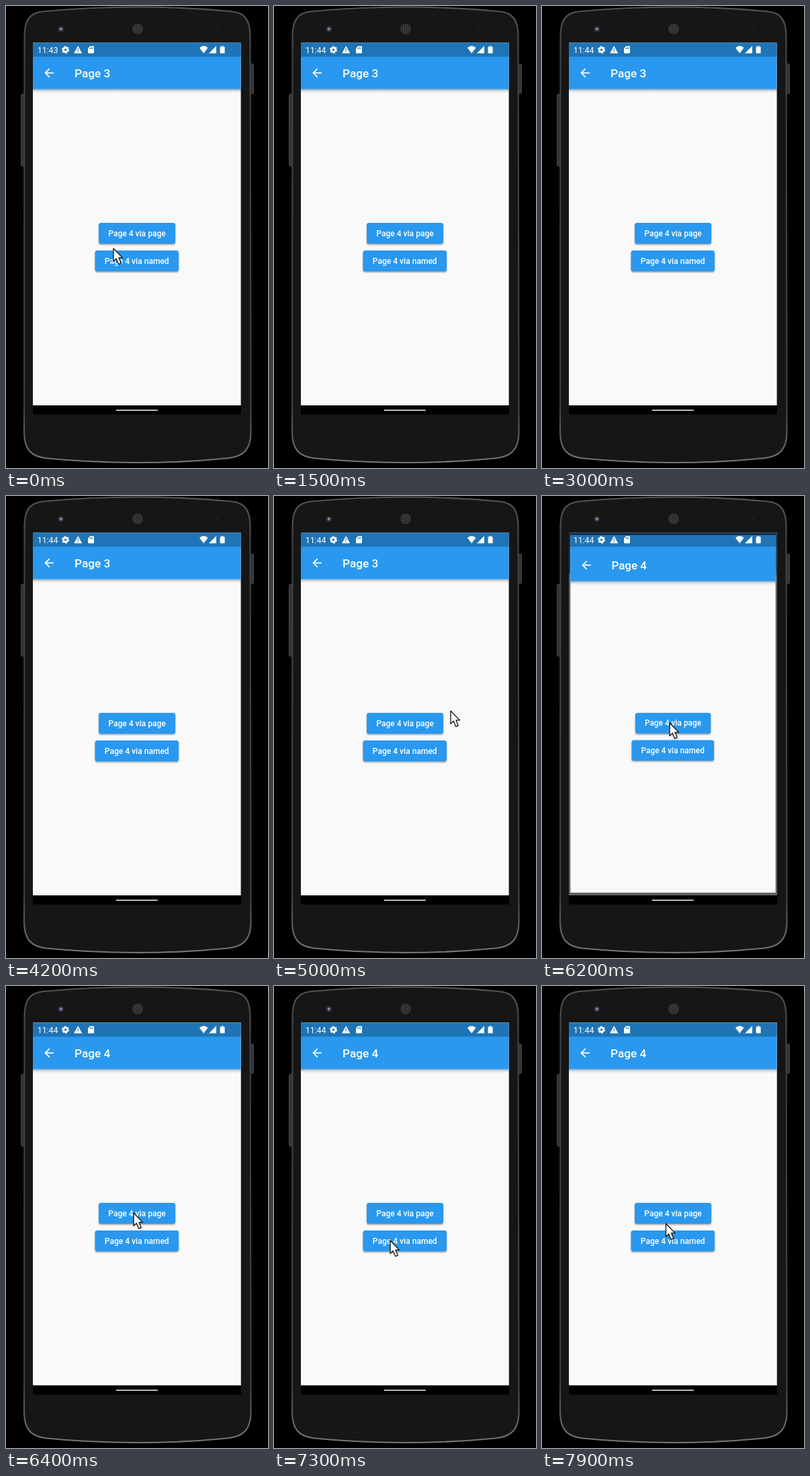
An HTML page that plays this animation: 390x686 px, repeating every 8 s.

```html
<!DOCTYPE html>
<html lang="en">
<head>
<meta charset="utf-8">
<title>Page navigation</title>
<style>
  html, body { margin: 0; width: 100%; height: 100%; overflow: hidden; background: #000; }
  svg { display: block; width: 390px; height: 686px; }
  text { font-family: Roboto, sans-serif; fill: #fff; }
  .title { font-size: 17.2px; font-weight: 500; }
  .label { font-size: 12.06px; font-weight: 500; text-anchor: middle; }
  .clock { font-size: 12.3px; }
</style>
</head>
<body>
<svg viewBox="0 0 390 686" xmlns="http://www.w3.org/2000/svg">
  <defs>
    <linearGradient id="rim" x1="0" y1="0" x2="0" y2="1">
      <stop offset="0" stop-color="#555"/>
      <stop offset=".12" stop-color="#404040"/>
      <stop offset=".88" stop-color="#404040"/>
      <stop offset="1" stop-color="#777"/>
    </linearGradient>
    <linearGradient id="barShade" x1="0" y1="0" x2="0" y2="1">
      <stop offset="0" stop-opacity=".34"/>
      <stop offset=".4" stop-opacity=".11"/>
      <stop offset="1" stop-opacity="0"/>
    </linearGradient>
    <pattern id="mesh" width="3" height="3" patternUnits="userSpaceOnUse">
      <rect width="3" height="3" fill="#1d1d1d"/>
      <circle cx="1" cy="1" r=".9" fill="#565656"/>
      <circle cx="2.5" cy="2.5" r=".6" fill="#444"/>
    </pattern>
    <filter id="soft" x="-10%" y="-30%" width="120%" height="180%">
      <feGaussianBlur stdDeviation="1.1"/>
    </filter>
    <clipPath id="screen"><rect x="40" y="54.400" width="309.600" height="538.600"/></clipPath>
    <clipPath id="btn"><rect x="138" y="322" width="114" height="31" rx="3.400"/></clipPath>
  </defs>

  <rect width="390" height="686" fill="#000"/>

  <!-- phone -->
  <rect x="22.500" y="131" width="6" height="107" rx="2" fill="#333" stroke="#484848"/>
  <rect x="362.500" y="86" width="6" height="44" rx="2" fill="#333" stroke="#484848"/>
  <path d="M27.500 46C27.500 22 34 10 56 8C105 3.500 150 1.500 195 1.500C240 1.500 286 3.500 335 8C357 10 363.500 22 363.500 46L364.500 634C364 658 354 669 330 671.500C285 676 240 678 195 678C150 678 105 676 60 671.500C37 669 27.500 658 27 634Z"
        fill="#161616" stroke="url(#rim)" stroke-width="2.200"/>
  <circle cx="81.800" cy="34.200" r="4.800" fill="#2b2b30"/>
  <circle cx="81.800" cy="34.200" r="2.600" fill="#565674"/>
  <circle cx="81.600" cy="34" r="1.300" fill="#a5a5c5"/>
  <circle cx="196" cy="34" r="8" fill="url(#mesh)"/>
  <circle cx="304" cy="34" r="2.500" fill="#1c1c1c"/>
  <circle cx="315" cy="34" r="2.500" fill="#1c1c1c"/>

  <!-- screen -->
  <g clip-path="url(#screen)">
    <g id="back"></g>
    <rect id="scrim" x="40" y="54" width="310" height="539" opacity="0"/>
    <g id="front"></g>
    <rect x="40" y="54" width="310" height="21.200" opacity=".24"/>
  </g>
  <rect x="40" y="593" width="310" height="13.500" fill="#000"/>
  <rect x="163.500" y="599.400" width="62.500" height="1.600" rx=".8" fill="#f2f2f2"/>

  <!-- status icons -->
  <text id="clock" class="clock" x="46.800" y="69.500"></text>
  <g fill="#fff">
    <circle cx="88.500" cy="65" r="3.100" fill="none" stroke="#fff" stroke-width="2.700"/>
    <circle cx="88.500" cy="65" r="4.700" fill="none" stroke="#fff" stroke-width="1.700" stroke-dasharray="2.700 2.222"/>
    <path d="M107.200 59.300L113.300 70.200H101.100Z"/>
    <path d="M106.600 63h1.200v3.200h-1.200zM106.600 67.300h1.200v1.200h-1.200z" fill="#1f74b5"/>
    <path d="M125.300 59.500H130Q131 59.500 131 60.500V69.200Q131 70.200 130 70.200H123Q122 70.200 122 69.200V62.800Z"/>
    <path d="M124.300 62h1v2h-1zM126.200 61.200h1v2.800h-1zM128.100 61.200h1v2.800h-1z" fill="#1f74b5"/>
    <path d="M294.200 70.200L287.900 62Q294.200 56.700 300.500 62Z"/>
    <path d="M313 59.300V70.200H302Z"/>
    <path d="M320.800 59.200h2.600v1.200h1.600q.6 0 .6.600v8.600q0 .6-.6.600h-5.800q-.6 0-.6-.6v-8.600q0-.6.6-.6h1.600z"/>
  </g>

  <path id="cursor" d="M1 1V20.200L5.200 16.300L8.600 24.300L12.300 22.800L9 14.900H14.500Z"
        fill="#fff" stroke="#111" stroke-width="1.300" stroke-linejoin="round"/>
</svg>
<script>
const LOOP = 8000, STEP = 100;
const CENTER = [195, 323.5];
const CLOCK_TICK = 1500, PUSH = 6000, PUSH_END = 6400;
const $ = id => document.getElementById(id);
const clamp = v => Math.max(0, Math.min(1, v));

// Each run of the pointer: [time, x, y]; it is hidden between runs.
const RUNS = [
  [[0, 159, 359], [400, 159, 359], [500, 45, 360], [600, 25, 360], [700, 25, 360]],
  [[4500, 140, 228], [4600, 224, 250], [4700, 306, 301], [4800, 303, 307],
   [4900, 288, 315], [5000, 262, 318], [5100, 236, 306], [5200, 221, 311],
   [5300, 218, 324], [5400, 209, 327], [5600, 189, 336], [6900, 189, 336],
   [7300, 172, 377], [7500, 172, 377], [7900, 183.5, 352], [8000, 183.5, 352]]
];

function button(x, y, w, label) {
  const box = `x="${x}" width="${w}" height="31" rx="3.4"`;
  return `<rect ${box} y="${y + 1.6}" opacity=".38" filter="url(#soft)"/>
    <rect ${box} y="${y}" fill="#2998ee"/>
    <text class="label" x="${x + w / 2}" y="${y + 19.7}">${label}</text>`;
}

function page(title, extra = "") {
  return `<rect x="40" y="54" width="310" height="539" fill="#f9f9f9"/>
    <rect x="40" y="123.6" width="310" height="6" fill="url(#barShade)"/>
    <rect x="40" y="54" width="310" height="69.6" fill="#2998ee"/>
    <path transform="translate(53.800 89) scale(.861)" fill="#fff"
      d="M20 11H7.830l5.590-5.590L12 4l-8 8 8 8 1.410-1.410L7.830 13H20v-2z"/>
    <text class="title" x="102" y="106">${title}</text>
    ${button(138, 322, 114, "Page 4 via page")}
    ${button(132.5, 363, 124.5, "Page 4 via named")}${extra}`;
}

$("back").innerHTML = page("Page 3",
  `<g clip-path="url(#btn)"><circle id="ripple" cx="189" cy="336" r="0" fill="#fff" opacity=".22"/></g>`);
$("front").innerHTML = page("Page 4");

function zoom(el, s) {
  const [x, y] = CENTER;
  el.setAttribute("transform", `translate(${x} ${y}) scale(${s}) translate(${-x} ${-y})`);
}

function pointer(t) {
  const run = RUNS.find(r => t >= r[0][0] && t < r[r.length - 1][0]);
  if (!run) return null;
  const i = run.findIndex(k => k[0] > t);
  const a = run[i - 1], b = run[i];
  const u = (t - a[0]) / (b[0] - a[0]);
  return [a[1] + (b[1] - a[1]) * u, a[2] + (b[2] - a[2]) * u];
}

function draw(time) {
  const t = Math.floor((time % LOOP) / STEP) * STEP;
  $("clock").textContent = t < CLOCK_TICK ? "11:43" : "11:44";

  const since = Math.max(0, t - PUSH);
  const p = t >= PUSH_END ? 1 : 1 - Math.exp(-since * .0115);
  zoom($("back"), 1 + .05 * p);
  zoom($("front"), .85 + .15 * p);
  $("front").setAttribute("opacity", clamp(since / 125));
  $("scrim").setAttribute("opacity", .6 * clamp((since - 50) / 120));
  $("ripple").setAttribute("r", t >= PUSH ? 22 + since * .4 : 0);

  const at = pointer(t);
  $("cursor").setAttribute("visibility", at ? "visible" : "hidden");
  if (at) $("cursor").setAttribute("transform", `translate(${at[0]} ${at[1]})`);
}

const start = performance.now();
function frame() {
  draw(performance.now() - start);
  requestAnimationFrame(frame);
}
draw(0);
requestAnimationFrame(frame);
</script>
</body>
</html>
```
